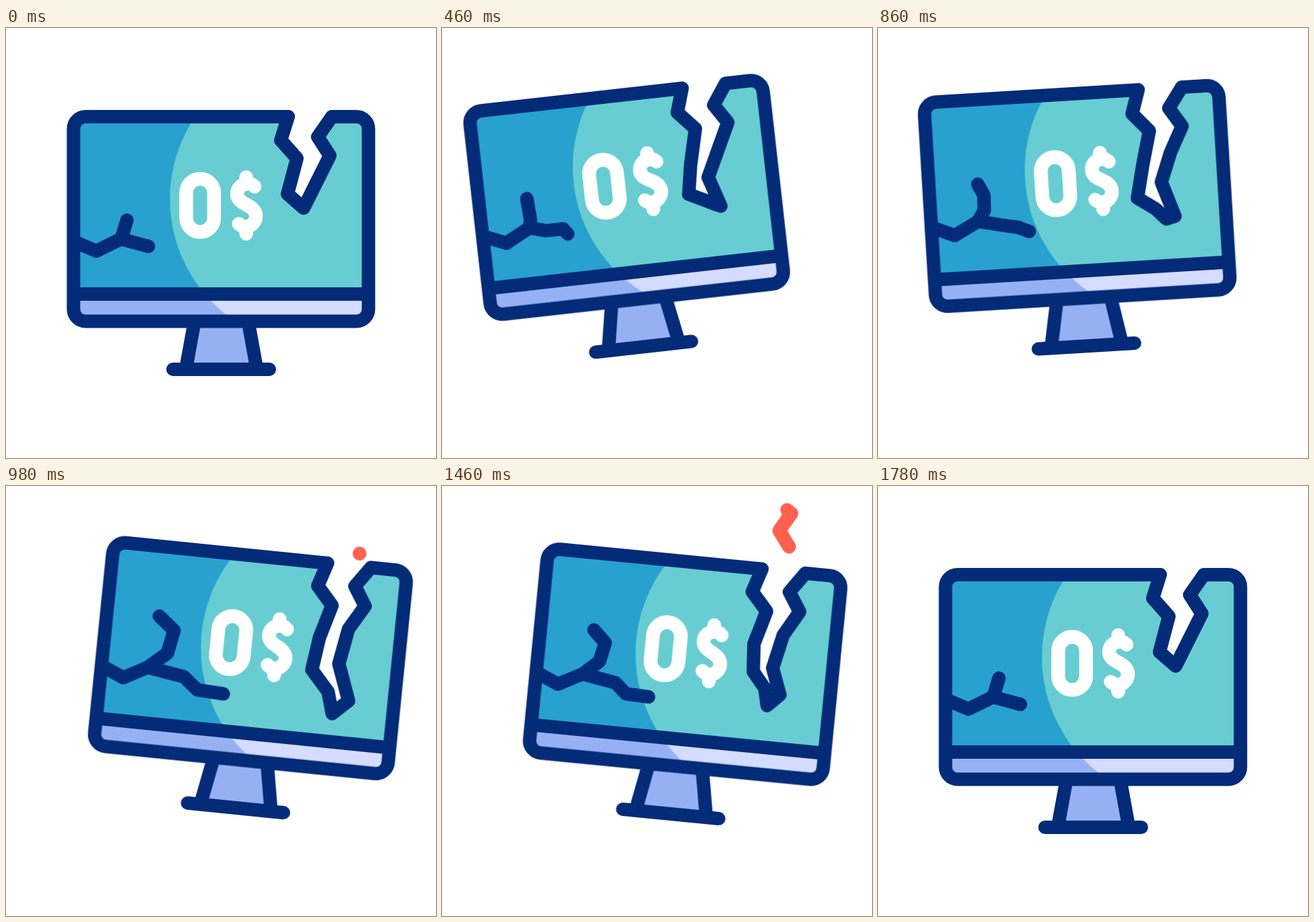
Recreate the animation shown at these times as an HTML page without scripts. Size 640 by 640 pixels, loop 2.4 s.

```html
<!DOCTYPE html>
<html lang="en">
<head>
<meta charset="utf-8">
<title>Broken monitor</title>
<style>
  html, body { margin: 0; width: 100%; height: 100%; overflow: hidden; background: #fff; }
  svg { display: block; width: 100vw; height: 100vh; }

  .line { fill: none; stroke: #042b78; stroke-width: 20; stroke-linecap: round; stroke-linejoin: round; }
  .white { fill: none; stroke: #fff; stroke-width: 20.5; stroke-linecap: round; stroke-linejoin: round; }
  .spark { fill: none; stroke: #ff6150; stroke-width: 20.5; stroke-linecap: round; stroke-linejoin: round; }
  .gap { fill: #fff; }

  .monitor, .gap, .up, .right { animation: sway 2.4s infinite; }
  .monitor { transform-origin: 320px 320px; }
  .gap { animation-name: gap; }
  .up { animation-name: up; }
  .right { animation-name: right; }
  .zig { animation: zig 2.4s linear infinite; }
  .dash { animation: dash 2.4s linear infinite; }

  /* rest, tilt left, tilt right, rest, pause */
  @keyframes sway {
    0% { transform: translate(0, 0) rotate(0deg); animation-timing-function: cubic-bezier(.65, 0, .55, 1); }
    25% { transform: translate(-47px, -36.9px) rotate(-7.3deg); animation-timing-function: cubic-bezier(.8, 0, .2, 1); }
    50% { transform: translate(53.9px, -26.7px) rotate(7.8deg); animation-timing-function: cubic-bezier(.62, 0, .54, 1); }
    74.167%, 100% { transform: translate(0, 0) rotate(0deg); }
  }
  @keyframes gap {
    0% {
      d: path("M420 132L409 167L433 194L419 247L443 268L443 268L443 268L443 268L443 268L462.5 229L482 190L464 162L485 132");
      animation-timing-function: cubic-bezier(.65, 0, .55, 1);
    }
    25% {
      d: path("M420 132L409 167L433 194L420 247L408 293L434 306L451 315L460 319L444 268L463 229L482 190L464 162L485 132");
      animation-timing-function: cubic-bezier(.8, 0, .2, 1);
    }
    50% {
      d: path("M420 132L409 167L433 194L419 243L413.5 292L441 325L449 360L473.5 335L453 281L460.5 226L482 190L464 162L485 132");
      animation-timing-function: cubic-bezier(.62, 0, .54, 1);
    }
    74.167%, 100% {
      d: path("M420 132L409 167L433 194L419 247L443 268L443 268L443 268L443 268L443 268L462.5 229L482 190L464 162L485 132");
    }
  }
  @keyframes up {
    0% { d: path("M171 314L174 306L176 299L180 286"); animation-timing-function: cubic-bezier(.65, 0, .55, 1); }
    25% { d: path("M171 313L174 301L172.5 283L171 267"); animation-timing-function: cubic-bezier(.8, 0, .2, 1); }
    50% { d: path("M169 313L200 287L207.5 250L180 230.5"); animation-timing-function: cubic-bezier(.62, 0, .54, 1); }
    74.167%, 100% { d: path("M171 314L174 306L176 299L180 286"); }
  }
  @keyframes right {
    0% { d: path("M104 319L134.5 332L171 314L195 320.4L204 322.8L212 325"); animation-timing-function: cubic-bezier(.65, 0, .55, 1); }
    25% { d: path("M104 319L134.5 332L171 313L195.5 320L223 320L229 329"); animation-timing-function: cubic-bezier(.8, 0, .2, 1); }
    50% { d: path("M104 319L134.5 332L169 313L229 322L249.5 342L294 343"); animation-timing-function: cubic-bezier(.62, 0, .54, 1); }
    74.167%, 100% { d: path("M104 319L134.5 332L171 314L195 320.4L204 322.8L212 325"); }
  }
  @keyframes zig {
    0%, 40.4% { opacity: 0; d: path("M466 113L466 113L466 113L466 112.9"); }
    40.41%, 40.9% { opacity: 1; d: path("M466 113L466 113L466 113L466 112.9"); }
    54.167% { d: path("M448 107L447 71L473.5 50.5L472.3 41.4"); }
    60.833% { d: path("M457 95.6L440 73L455.6 45.5L449 41"); }
    68.3% { opacity: 1; d: path("M448 22L448 22L448 22L448 21.9"); }
    68.31%, 100% { opacity: 0; d: path("M448 22L448 22L448 22L448 21.9"); }
  }
  @keyframes dash {
    0%, 47.5% { opacity: 0; d: path("M490 90L490.1 90"); }
    47.51% { opacity: 1; d: path("M490 90L490.1 90"); }
    54.167% { d: path("M510.3 68.5L524.2 68"); }
    57.5% { opacity: 1; d: path("M526 67L526.1 67"); }
    57.51%, 100% { opacity: 0; d: path("M526 67L526.1 67"); }
  }
</style>
</head>
<body>
<svg viewBox="0 0 640 640">
  <clipPath id="panel"><rect x="100.5" y="132" width="439" height="304.5" rx="18"/></clipPath>
  <clipPath id="disc"><circle cx="463" cy="254.5" r="219"/></clipPath>
  <g class="monitor">
    <path d="M280 440L268.5 508H372.5L361 440Z" fill="#96b1f3"/>
    <path class="line" d="M280 440L268.5 503M361 440L372.5 503M248.5 508H392"/>

    <g clip-path="url(#panel)">
      <path d="M100 132H540V396H100Z" fill="#28a1cf"/>
      <path d="M100 396H540V437H100Z" fill="#96b1f3"/>
      <g clip-path="url(#disc)">
        <path d="M100 132H540V396H100Z" fill="#67cdd2"/>
        <path d="M100 396H540V437H100Z" fill="#d4dcff"/>
      </g>
    </g>

    <rect class="white" x="268.2" y="224.5" width="41.5" height="79" rx="20.7"/>
    <path class="white" d="M370 236C366 232 361 231 357 232C350 233 344 239 344 247C344 255 350 259 358 263C366 267 372 272 372 280C372 288 366 295 358 296C353 296 349 294 346.5 291.5M357.5 222V232M357.5 296V306"/>

    <path class="line right" d="M104 319L134.5 332L171 314L195 320.4L204 322.8L212 325"/>
    <path class="line up" d="M171 314L174 306L176 299L180 286"/>
    <path class="line" d="M485 132H521.5A18 18 0 0 1 539.5 150V418.5A18 18 0 0 1 521.5 436.5H118.5A18 18 0 0 1 100.5 418.5V150A18 18 0 0 1 118.5 132H420M100.5 396H539.5"/>
    <path class="line gap" d="M420 132L409 167L433 194L419 247L443 268L443 268L443 268L443 268L443 268L462.5 229L482 190L464 162L485 132"/>

    <path class="spark zig" opacity="0" d="M466 113L466 113L466 113L466 112.9"/>
    <path class="spark dash" opacity="0" d="M490 90L490.1 90"/>
  </g>
</svg>
</body>
</html>
```
